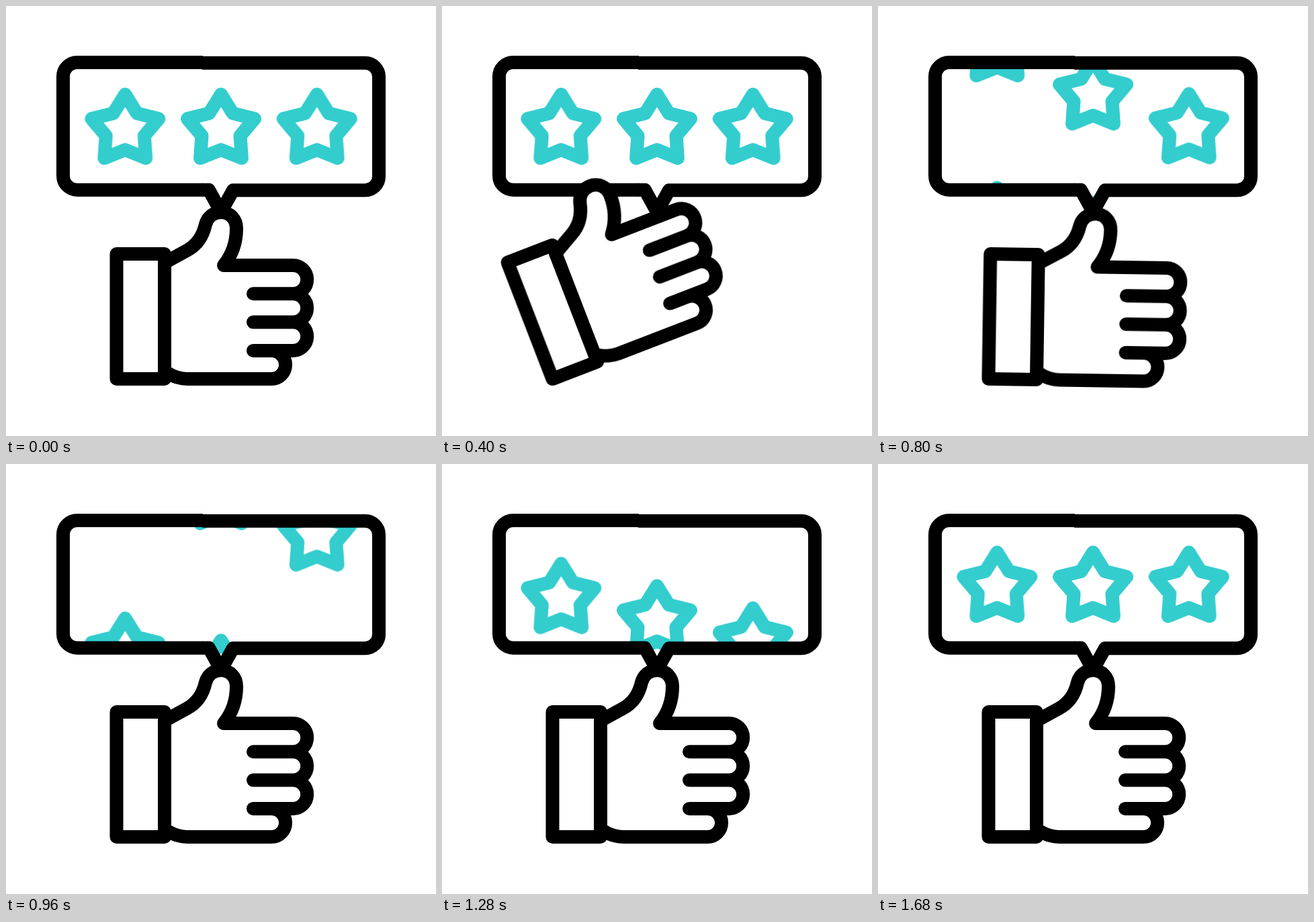
An HTML page without scripts for the animation above (2 s loop, 640 by 640 pixels).

```html
<!DOCTYPE html>
<html lang="en">
<head>
<meta charset="utf-8">
<title>Thumbs up rating</title>
<style>
  html, body { margin: 0; width: 100%; height: 100%; overflow: hidden; background: #fff; }
  svg { display: block; width: 100%; height: 100%; }

  .line { fill: none; stroke: #000; stroke-width: 20; stroke-linecap: round; stroke-linejoin: round; }
  .flat { stroke-linecap: butt; }
  .star { fill: none; stroke: #33cdce; stroke-width: 20; stroke-linejoin: round; }

  .hand {
    fill: #fff;
    transform-origin: 165px 555px;
    animation: wave 2s cubic-bezier(.33, 0, .67, 1) infinite;
  }
  .leave { animation: leave 2s calc(var(--i) * 120ms) infinite both; }
  .enter { animation: enter 2s calc(var(--i) * 130ms) infinite both; }

  @keyframes wave {
    0%, 5% { transform: rotate(0deg); }
    20% { transform: rotate(-21.1deg); }
    30% { transform: rotate(12deg); }
    42%, 100% { transform: rotate(0deg); }
  }
  @keyframes leave {
    0%, 27.3% { transform: translateY(0); animation-timing-function: cubic-bezier(.33, 0, .67, 1); }
    44.1%, 100% { transform: translateY(-144px); }
  }
  /* speeds up, cruises, then slows down at a matching rate */
  @keyframes enter {
    0%, 29.6% { transform: translateY(165px); animation-timing-function: cubic-bezier(.333, 0, .667, .333); }
    40% { transform: translateY(139px); animation-timing-function: linear; }
    64% { transform: translateY(17px); animation-timing-function: cubic-bezier(.333, .667, .667, 1); }
    70.65%, 100% { transform: translateY(0); }
  }
</style>
</head>
<body>
<svg viewBox="0 0 640 640">
  <defs>
    <path id="star" class="star" d="M0-52.5 17.6-24.3 50-16.2 28.5 9.3 30.9 42.5 0 30
      -30.9 42.5-28.5 9.3-50-16.2-17.6-24.3Z"/>
    <clipPath id="inside">
      <path d="M106 84H535a20 20 0 0 1 20 20V254a20 20 0 0 1-20 20H337.5L320 306.5 302.5 274H106
        a21 21 0 0 1-21-21V105a21 21 0 0 1 21-21Z"/>
    </clipPath>
  </defs>

  <g clip-path="url(#inside)">
    <g style="--i:0">
      <use class="leave" href="#star" x="177.3" y="184"/>
      <use class="enter" href="#star" x="177.3" y="184"/>
    </g>
    <g style="--i:1">
      <use class="leave" href="#star" x="320" y="184"/>
      <use class="enter" href="#star" x="320" y="184"/>
    </g>
    <g style="--i:2">
      <use class="leave" href="#star" x="462.7" y="184"/>
      <use class="enter" href="#star" x="462.7" y="184"/>
    </g>
  </g>

  <!-- the two halves of the bubble sit slightly out of line -->
  <path class="line flat" d="M293 84H106a21 21 0 0 0-21 21V252.7a21 21 0 0 0 21 21H293"/>
  <path class="line flat" d="M292 84.7H534.5a20.5 20.5 0 0 1 20.5 20.5V253.7a20.5 20.5 0 0 1-20.5 20.5
    H338L320 306.5 302 273.7H292"/>

  <g class="hand">
    <path class="line" style="fill:#fff" d="M238 381 269 364C284 356 293 343 297 325 300 314 309 307 320 307
      333 307 343 317 343 331 343 352 337 370 324 386
      H427a21 21 0 0 1 0 42.3H368H427a21 21 0 0 1 0 42.3H368H427a21 21 0 0 1 0 42.3H368H395
      a21 21 0 0 1 0 42.1H270C258 555 248 551 240 546"/>
    <path class="line" style="fill:#fff" d="M164.5 369H236V555H164.5Z"/>
  </g>
</svg>
</body>
</html>
```
